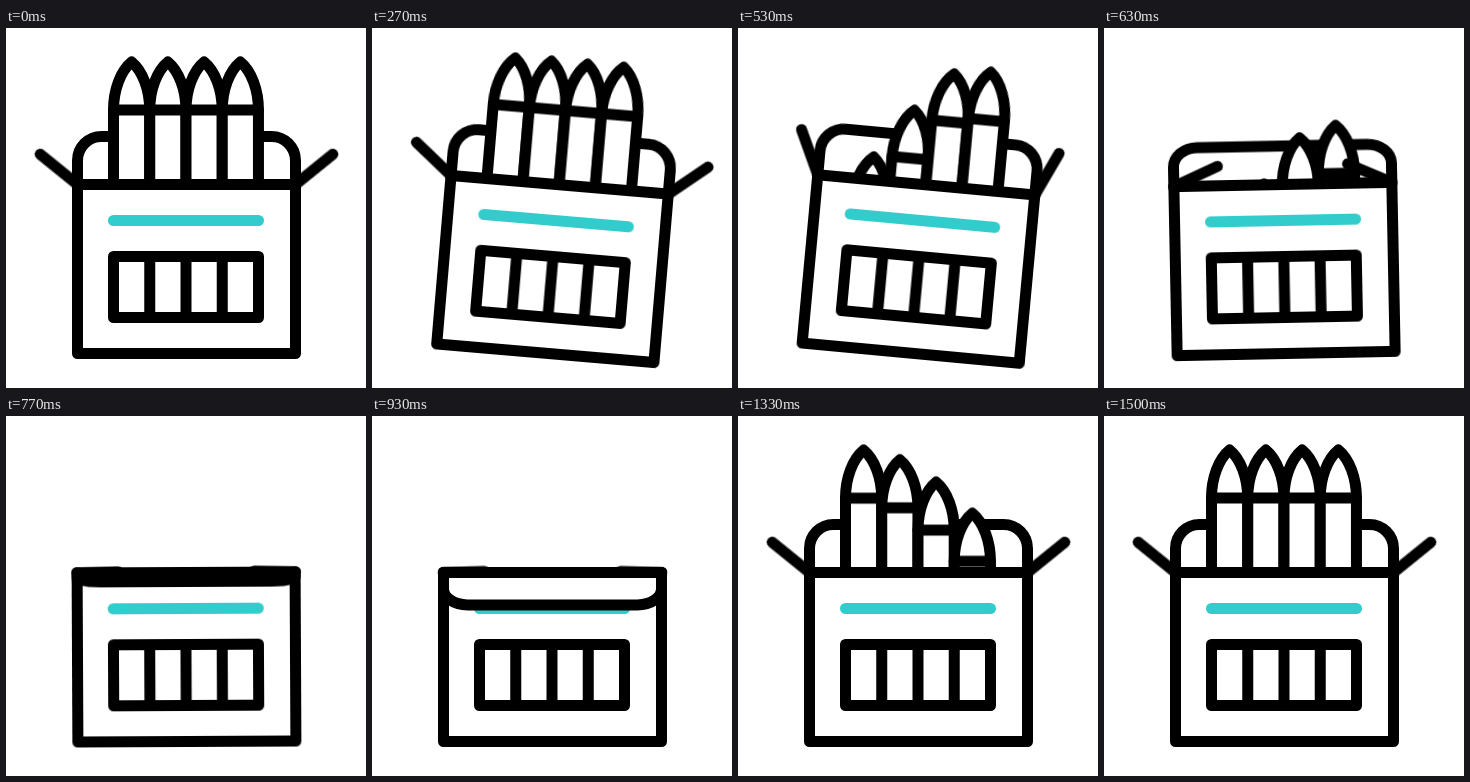
Recreate the animation shown at these times as an HTML page. Size 360 by 360 pixels, loop 1670 ms.

```html
<!DOCTYPE html>
<html lang="en">
<head>
<meta charset="utf-8">
<title>Crayon box</title>
<style>
  html, body { margin: 0; width: 100%; height: 100%; overflow: hidden; background: #fff; }
  svg { display: block; width: 100vw; height: 100vh; }

  path, rect {
    fill: #fff;
    stroke: #000;
    stroke-width: 11;
    stroke-linecap: round;
    stroke-linejoin: round;
  }
  .bar { stroke: #3cc; }

  .scene, .crayon, .flap, .lid, .front {
    animation: 1670ms cubic-bezier(.37, 0, .63, 1) infinite;
  }
  .scene { transform-origin: 180.5px 241px; animation-name: rock; }
  .flap { animation-name: fold; }
  .lid { animation-name: close; }
  .front { animation-name: swap; animation-timing-function: step-end; }
  .c1 { animation-name: dip1; }
  .c2 { animation-name: dip2; }
  .c3 { animation-name: dip3; }
  .c4 { animation-name: dip4; }

  @keyframes rock {
    0%, 6% { transform: rotate(0deg); }
    14.6% { transform: rotate(6.1deg); }
    23.65% { transform: rotate(-10deg); }
    31.9% { transform: rotate(5.3deg); }
    39.95% { transform: rotate(-2.4deg); }
    47.9%, 100% { transform: rotate(0deg); }
  }

  @keyframes dip1 {
    0%, 21.1%, 80.1%, 100% { transform: translateY(0); }
    37.1%, 60.9% { transform: translateY(132px); }
  }
  @keyframes dip2 {
    0%, 25.5%, 83.1%, 100% { transform: translateY(0); }
    40.5%, 63.9% { transform: translateY(132px); }
  }
  @keyframes dip3 {
    0%, 29%, 86%, 100% { transform: translateY(0); }
    45%, 66.9% { transform: translateY(132px); }
  }
  @keyframes dip4 {
    0%, 29.9%, 89%, 100% { transform: translateY(0); }
    45.9%, 69.9% { transform: translateY(132px); }
  }

  /* side flaps swing in and shorten slightly once flat */
  @keyframes fold {
    0%, 28%, 79.8%, 100% { transform: rotate(-141deg); }
    41.3%, 66.5% { transform: rotate(-1.4deg); }
    0%, 37.9%, 69.9%, 100% { d: path("M0 0H48"); }
    41.6%, 66.2% { d: path("M0 0H41"); }
  }

  /* the lid tips from behind the box to its front */
  @keyframes close {
    0%, 33.2%, 74.6%, 100% {
      d: path("M71.5 156.5V132.5C71.5 119.2 82.2 108.5 95.5 108.5H265.5C278.8 108.5 289.5 119.2 289.5 132.5V156.5");
    }
    53.9% {
      d: path("M71.5 156.5V173.5C71.5 182.9 82.2 190.5 95.5 190.5H265.5C278.8 190.5 289.5 182.9 289.5 173.5V156.5");
    }
  }
  @keyframes swap {
    0%, 63.1%, 100% { visibility: hidden; }
    44.7% { visibility: visible; }
  }
</style>
</head>
<body>
<svg viewBox="0 0 360 360">
  <defs>
    <g id="crayon">
      <path d="M0 160V82C0 62 7 43 18.1 34C29.2 43 36.2 62 36.2 82V160"/>
      <path d="M0 82H36.2"/>
    </g>
  </defs>
  <g class="scene">
    <path class="lid" d="M71.5 156.5V132.5C71.5 119.2 82.2 108.5 95.5 108.5H265.5C278.8 108.5 289.5 119.2 289.5 132.5V156.5"/>

    <g class="crayon c1"><use href="#crayon" x="107.5"/></g>
    <g class="crayon c2"><use href="#crayon" x="143.75"/></g>
    <g class="crayon c3"><use href="#crayon" x="180"/></g>
    <g class="crayon c4"><use href="#crayon" x="216.25"/></g>

    <g transform="translate(71.5 156.5)"><path class="flap" d="M0 0H48"/></g>
    <g transform="translate(289.5 156.5) scale(-1 1)"><path class="flap" d="M0 0H48"/></g>

    <rect x="71.5" y="156.5" width="218" height="169"/>
    <path class="bar" d="M107.5 192.5H252.5"/>
    <rect x="107.5" y="228.5" width="145" height="61"/>
    <path d="M143.75 228.5V289.5M180 228.5V289.5M216.25 228.5V289.5"/>

    <g class="front">
      <path class="lid" d="M71.5 156.5V132.5C71.5 119.2 82.2 108.5 95.5 108.5H265.5C278.8 108.5 289.5 119.2 289.5 132.5V156.5"/>
      <path d="M71.5 156.5H289.5"/>
    </g>
  </g>
</svg>
</body>
</html>
```
